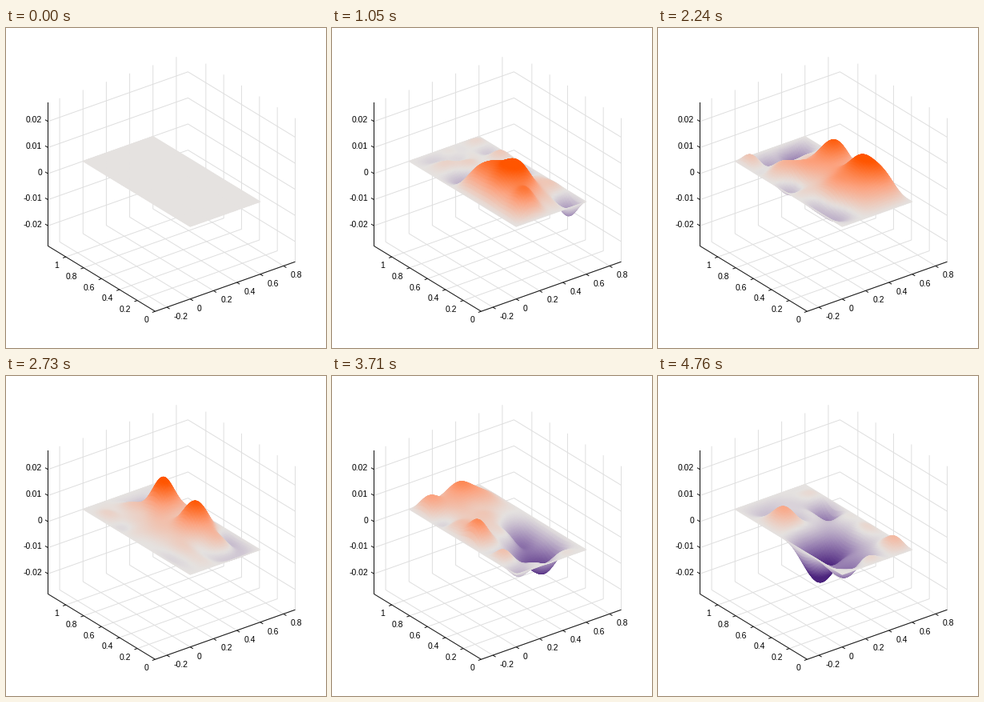
A matplotlib script that plays this animation: 400x400 px, repeating every 4.83 s.

```python
import numpy as np
import matplotlib.pyplot as plt
from matplotlib.animation import FuncAnimation
from matplotlib.collections import LineCollection
from matplotlib.colors import LinearSegmentedColormap

plt.rcParams["font.family"] = "Liberation Sans"

FRAMES, INTERVAL = 69, 70
X0, X1, Y1 = -0.3, 0.9, 1.2       # axis limits
ZSCALE = 3260                     # pixels per unit of height
ZMIN, ZMAX = -90.5 / ZSCALE, 89 / ZSCALE
FULL = 0.0125                     # height of the strongest colour

# --- plate: struck once, then vibrating in its own modes ---
WIDTH, LENGTH = 0.6, 1.2
HIT_X, HIT_Y, HIT_STEP = 0.19, 0.37, 2
STRENGTH = 6.8e-4
TENSION, STIFFNESS = 8.35e-5, 9.4e-7

kx = np.pi * np.arange(1, 6) / WIDTH
ky = np.pi * np.arange(1, 11) / LENGTH
k2 = kx[:, None] ** 2 + ky ** 2
omega = np.sqrt(TENSION * k2 + STIFFNESS * k2 ** 2)
gain = STRENGTH * np.outer(np.sin(kx * HIT_X), np.sin(ky * HIT_Y)) / omega

# far points first, so that near parts are painted over far ones
xs = np.linspace(WIDTH, 0, 41)
ys = np.linspace(LENGTH, 0, 81)
shape_x = np.sin(np.outer(xs, kx))
shape_y = np.sin(np.outer(ky, ys))


def height(step):
    t = max(step - HIT_STEP, 0)
    return shape_x @ (gain * np.sin(omega * t)) @ shape_y


def project(x, y, z):
    """Oblique view of the box, in pixels from the top left."""
    u, v = (x - X0) / (X1 - X0), y / Y1
    sx = 186.5 + 175 * u - 134 * v
    sy = 354.2 - 62 * u - 81.7 * v - ZSCALE * (z - ZMIN)
    return np.stack(np.broadcast_arrays(sx, sy), axis=-1)


def path(*corners):
    return np.array([project(*c) for c in corners])


# --- stage ---
fig = plt.figure(figsize=(4, 4), dpi=100, facecolor="white")
ax = fig.add_axes([0, 0, 1, 1])
ax.set(xlim=(0, 400), ylim=(400, 0))
ax.axis("off")

XT = np.arange(-1, 5) * 0.2
YT = np.arange(6) * 0.2
ZT = np.arange(-2, 3) * 0.01

grid = [path((x, 0, ZMIN), (x, Y1, ZMIN), (x, Y1, ZMAX)) for x in XT]
grid += [path((X0, y, ZMIN), (X1, y, ZMIN), (X1, y, ZMAX)) for y in YT]
grid += [path((X0, Y1, z), (X1, Y1, z), (X1, 0, z)) for z in ZT]
ax.add_collection(LineCollection(grid, colors="#dedede", linewidths=0.7, zorder=1))

axes = [path((X0, Y1, ZMAX), (X0, Y1, ZMIN), (X0, 0, ZMIN), (X1, 0, ZMIN))]


def tick(pos, out, value, shift, align):
    p = project(*pos)
    axes.append(np.array([p, p + out]))
    ax.text(*(p + shift), f"{value:.1g}", ha=align, va="center_baseline",
            fontsize=7.5, color="black")


for x in XT:
    tick((x, 0, ZMIN), (3.5, 2.1), x, (8.8, 11), "left")
for y in YT:
    tick((X0, y, ZMIN), (-3.7, 1.3), y, (-8.3, 10.3), "right")
for z in ZT:
    tick((X0, Y1, z), (-3.5, -2.1), z, (-7.5, -2.4), "right")
ax.add_collection(LineCollection(axes, colors="#1a1a1a", linewidths=0.76, zorder=3))

STOPS = ["#4b237d", "#9880b2", "#e5e2e0", "#fca380", "#ff5500"]
cmap = LinearSegmentedColormap.from_list("plate", STOPS, 512)
gx, gy = np.meshgrid(xs, ys, indexing="ij")
shown = []


def draw(step):
    while shown:
        shown.pop().remove()
    z = height(step)
    px, py = np.moveaxis(project(gx, gy, z), -1, 0)
    shown.append(ax.pcolormesh(px, py, z, shading="gouraud", cmap=cmap,
                               vmin=-FULL, vmax=FULL, zorder=2))
    return shown


anim = FuncAnimation(fig, draw, frames=FRAMES, interval=INTERVAL,
                     repeat=True, repeat_delay=0, blit=False)
plt.show()
```
